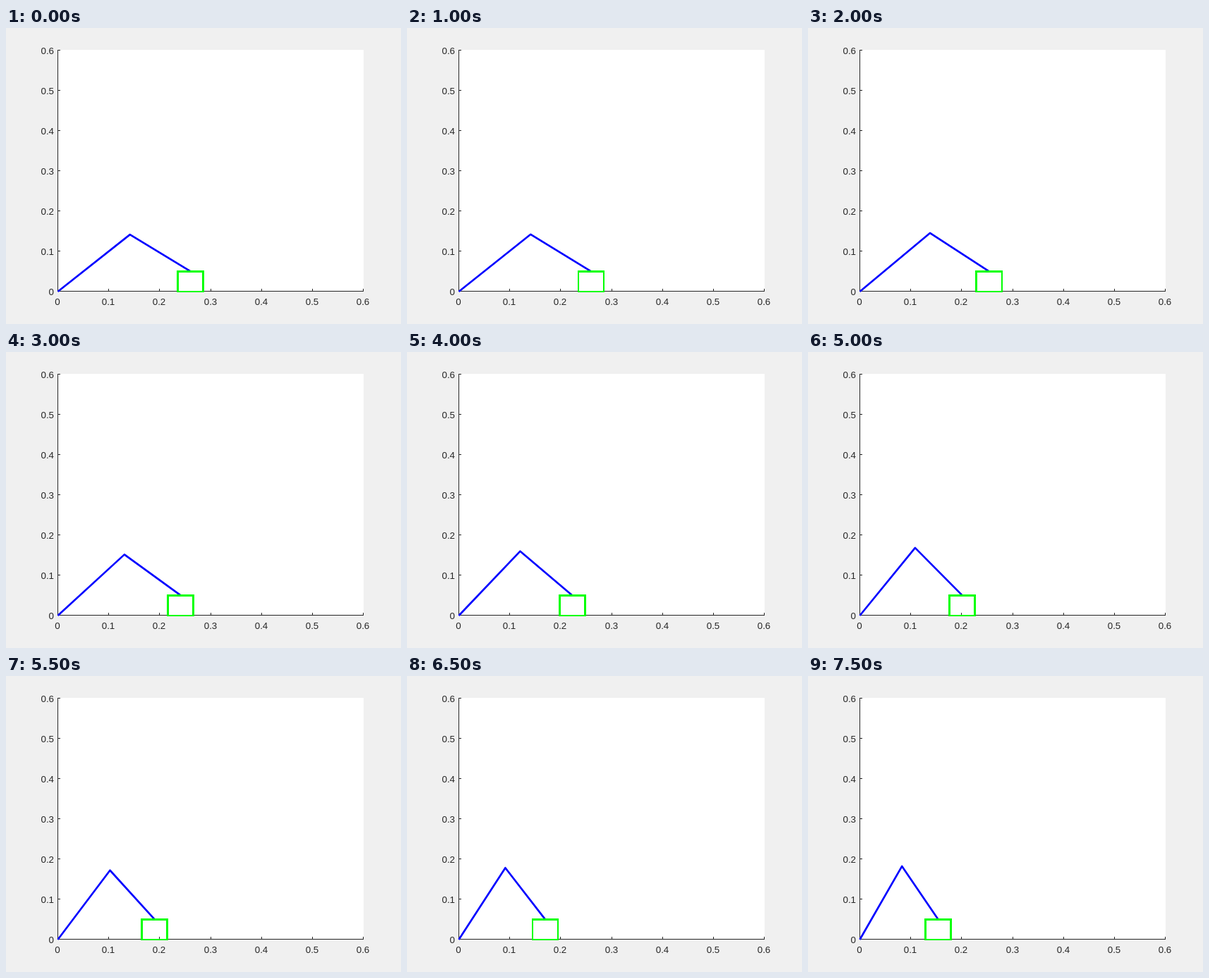
These frames come from a looping animation (560x420 px, 8000 ms). An HTML page with a canvas:

```html
<!DOCTYPE html>
<html lang="en">
<head>
<meta charset="utf-8">
<title>Two-link arm</title>
<style>
  html, body { margin: 0; width: 560px; height: 420px; overflow: hidden; background: #f0f0f0; }
  canvas { display: block; }
</style>
</head>
<body>
<canvas id="stage" width="560" height="420"></canvas>
<script>
const ctx = document.getElementById('stage').getContext('2d');
const STEP = 500, STEPS = 16, MOVE_STEPS = 20;
const L1 = 0.2, L2 = 0.15, BOX = 0.05;
const START_X = 0.2603, END_X = 0.1414;
const LINE = 8 / 3;
const INK = '#262626';

const px = x => 73.45 + x * 434 / 0.6;
const py = y => 374 - y * 343 / 0.6;

// Minimum-jerk profile
const ease = s => s * s * s * (10 - 15 * s + 6 * s * s);

// Elbow-up solution for a hand at (x, y)
function elbow(x, y) {
  const d2 = x * x + y * y;
  const a = Math.atan2(y, x) +
    Math.acos((L1 * L1 + d2 - L2 * L2) / (2 * L1 * Math.sqrt(d2)));
  return [L1 * Math.cos(a), L1 * Math.sin(a)];
}

function fill(color, x, y, w, h) {
  ctx.fillStyle = color;
  ctx.fillRect(x, y, w, h);
}

function drawAxes() {
  fill('#f0f0f0', 0, 0, 560, 420);
  fill('#fff', 73, 31, 434, 343);
  fill(INK, 73, 31, 1, 343);
  fill(INK, 73, 373, 434, 1);
  ctx.font = '13.33px "Liberation Sans", Arial, sans-serif';
  for (let i = 0; i <= 6; i++) {
    const label = i ? '0.' + i : '0';
    const x = Math.round(73 + i * 433 / 6);
    const y = Math.round(373 - i * 342 / 6);
    fill(INK, x, 370, 1, 4);
    fill(INK, 73, y, 4, 1);
    ctx.textAlign = 'center';
    ctx.fillText(label, x, 393);
    ctx.textAlign = 'right';
    ctx.fillText(label, 68, y + 6);
  }
}

// Whole pixels covered by a line centred on c
function span(c) {
  const from = Math.ceil(c - LINE / 2 - 0.5);
  return [from, Math.ceil(c + LINE / 2 - 0.5) - from];
}

function drawBox(x) {
  const [left, lw] = span(px(x - BOX / 2));
  const [right, rw] = span(px(x + BOX / 2));
  const [top, th] = span(py(BOX));
  const [bottom, bh] = span(py(0));
  const green = '#0f0';
  fill(green, left, top, right + rw - left, th);
  fill(green, left, bottom, right + rw - left, bh);
  fill(green, left, top, lw, bottom + bh - top);
  fill(green, right, top, rw, bottom + bh - top);
}

function drawArm(x) {
  const [ex, ey] = elbow(x, BOX);
  ctx.strokeStyle = '#00f';
  ctx.lineWidth = LINE;
  ctx.lineJoin = 'round';
  ctx.beginPath();
  ctx.moveTo(px(0), py(0));
  ctx.lineTo(px(ex), py(ey));
  ctx.lineTo(px(x), py(BOX));
  ctx.stroke();
}

const begin = performance.now();

function frame(now) {
  const step = Math.floor(Math.max(0, now - begin) / STEP) % STEPS;
  const x = START_X + (END_X - START_X) * ease(step / MOVE_STEPS);
  drawAxes();
  drawArm(x);
  drawBox(x);
  requestAnimationFrame(frame);
}
frame(begin);
</script>
</body>
</html>
```
